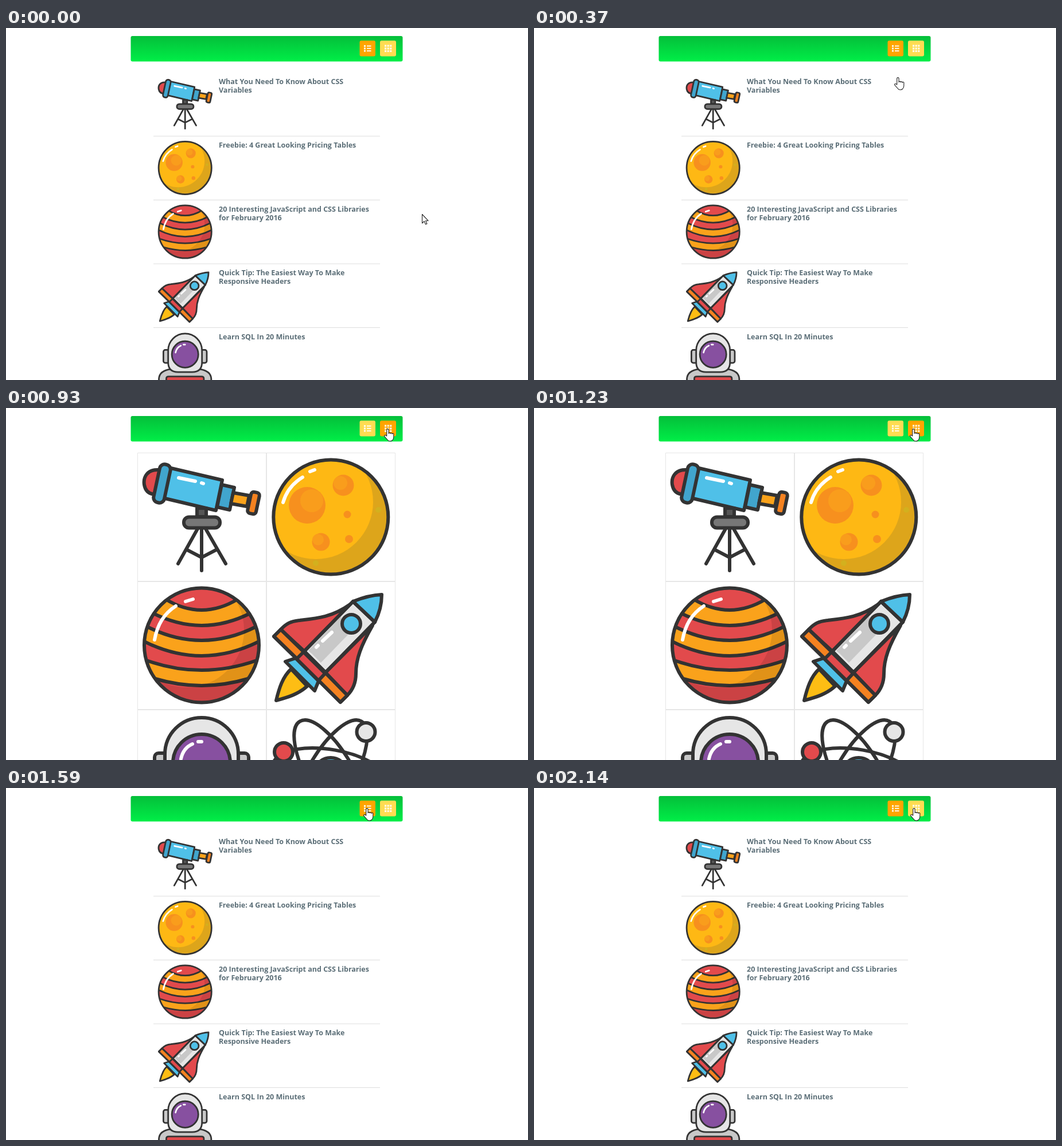
Recreate the animation shown at these times as an HTML page. Size 910 by 615 pixels, loop 2220 ms.

```html
<!DOCTYPE html>
<html lang="en">
<head>
<meta charset="utf-8">
<title>List and grid view</title>
<style>
html, body { margin: 0; width: 100%; height: 100%; overflow: hidden; background: #fff; }
svg { display: block; width: 100vw; height: 100vh; }
text { font: bold 12.5px "Open Sans", "Noto Sans", sans-serif; fill: #5b6e77; }
.ink { stroke: #333; stroke-width: 6; stroke-linejoin: round; stroke-linecap: round; }
.gloss { fill: none; stroke: #fff; stroke-width: 6; stroke-linecap: round; }
.line { fill: none; }
.red { fill: #e24a4c; }
.amber { fill: #faa21b; }
.orange { fill: #f58220; }
.sky { fill: #4fc0e8; }
.steel { fill: #41a5cd; }
.pale { fill: #e6e6e6; }
.gray { fill: #c8c8c8; }
.crater { fill: #f7901e; }
.pointer { fill: #fff; stroke: #222; stroke-width: 1.1; stroke-linejoin: round; }

.list, .grid, .list-button, .grid-button, .cursor, .arrow, .hand {
  animation: 2220ms step-end infinite;
}
.list { animation-name: list; }
.grid { animation-name: grid; }
.list-button { animation-name: list-button; }
.grid-button { animation-name: grid-button; }
.cursor { animation-name: move; }
.arrow { animation-name: arrow; }
.hand { animation-name: hand; }

@keyframes list { 0%, 71.622% { visibility: visible } 41.892% { visibility: hidden } }
@keyframes grid { 0%, 71.622% { visibility: hidden } 41.892% { visibility: visible } }
@keyframes list-button { 0%, 71.622% { fill: #ffa500 } 41.892% { fill: #ffdc52 } }
@keyframes grid-button { 0%, 71.622% { fill: #ffdc52 } 41.892% { fill: #ffa500 } }
@keyframes arrow { 0% { visibility: visible } 6.757%, 100% { visibility: hidden } }
@keyframes hand { 0% { visibility: hidden } 6.757%, 100% { visibility: visible } }
@keyframes move {
  0% { transform: translate(725px, 325px) }
  3.153% { transform: translate(697px, 270px) }
  6.757% { transform: translate(640px, 178px) }
  9.91% { transform: translate(616px, 132px) }
  13.063% { transform: translate(618px, 115px) }
  16.667% { transform: translate(628px, 86px) }
  20.27% { transform: translate(646px, 52px) }
  23.874% { transform: translate(659px, 36px) }
  55.405% { transform: translate(655px, 36px) }
  59.009% { transform: translate(644px, 36px) }
  62.162% { transform: translate(631px, 35px) }
  65.766% { transform: translate(623px, 35px) }
  89.64% { transform: translate(628px, 35px) }
  93.243% { transform: translate(642px, 35px) }
  96.396%, 100% { transform: translate(656px, 35px) }
}
</style>
</head>
<body>
<svg viewBox="0 0 910 615" preserveAspectRatio="none">
<defs>
  <linearGradient id="bar" x2="0" y2="1">
    <stop stop-color="#04bf3a"/><stop offset="1" stop-color="#00ee47"/>
  </linearGradient>
  <clipPath id="moon-disc"><circle cx="566.3" cy="190.5" r="100"/></clipPath>
  <clipPath id="planet-disc"><circle cx="341" cy="414.5" r="100"/></clipPath>

  <g id="telescope" class="ink">
    <path class="red" d="M266 108C246 107 239 121 241 134C243 146 251 151 262 151"/>
    <path class="sky" d="M283 104L377 126L366 179L273 157Z"/>
    <rect class="steel" x="-9.5" y="-34" width="19" height="68" rx="8.5" transform="translate(272 132) rotate(12)"/>
    <path class="steel" d="M376 134L398 139L390 178L368 173Z"/>
    <path class="amber" d="M396 148L424 153L420 172L392 167Z"/>
    <rect class="orange" x="-7.5" y="-19" width="15" height="38" rx="5" transform="translate(431.5 166) rotate(12)"/>
    <path class="gloss" d="M301 122L330 128M341 131L344 132"/>
    <path fill="#555" d="M333 175H349V190H333Z"/>
    <rect fill="#777" x="310" y="190.500" width="63" height="19" rx="9"/>
    <path class="line" d="M341 211V284M334 211L300 272M348 211L383 272M314 247L341 261L368 247"/>
  </g>

  <g id="moon">
    <g clip-path="url(#moon-disc)">
      <path fill="#dda51b" d="M460 85H672V296H460Z"/>
      <circle fill="#feb814" cx="540" cy="164" r="100"/>
    </g>
    <g class="crater">
      <circle cx="525" cy="170" r="32"/><circle cx="588" cy="135" r="18.500"/>
      <circle cx="549" cy="234" r="15.500"/><circle cx="595" cy="186" r="6.500"/><circle cx="598" cy="229" r="7"/>
    </g>
    <g fill="#f99d1c">
      <circle cx="533" cy="162" r="20"/><circle cx="583" cy="131" r="12"/><circle cx="544" cy="230" r="10"/>
    </g>
    <g fill="#d3b01e"><circle cx="649" cy="178" r="5"/><circle cx="540" cy="271" r="5"/></g>
    <circle class="ink line" cx="566.3" cy="190.500" r="100"/>
    <path class="gloss" d="M483 165Q491 137 517 121M530 111L538 108"/>
  </g>

  <g id="planet">
    <g class="ink" clip-path="url(#planet-disc)">
      <path class="red" d="M232 300H450V530H232Z"/>
      <path class="amber" d="M278 334Q341 372 404 334H450V530H232V334Z"/>
      <path class="red" d="M255 358Q341 402 427 358H450V530H232V358Z"/>
      <path class="amber" d="M246 382Q341 430 436 382H450V530H232V382Z"/>
      <path class="red" d="M241 408Q341 458 441 408H450V530H232V408Z"/>
      <path class="amber" d="M245 441Q341 475 437 441H450V530H232V441Z"/>
      <path class="red" d="M260 473Q341 497 422 473H450V530H232V473Z"/>
      <path stroke="none" fill-opacity=".1" fill-rule="evenodd" d="M232 300H450V530H232ZM215 388a100 100 0 1 0 200 0a100 100 0 1 0-200 0Z"/>
    </g>
    <circle class="ink line" cx="341" cy="414.500" r="100"/>
    <path class="gloss" d="M259 405Q266 365 296 346M313 338L326 334"/>
  </g>

  <g id="rocket" class="ink">
    <path fill="#fdbd14" d="M497 456C482 470 476 490 471 511C490 506 510 500 525 486Z"/>
    <path class="sky" d="M487 443L505 437L545 477L538 494Z"/>
    <path class="red" d="M600 343C568 366 540 368 512 371C497 372 488 377 479 387L520 425Z"/>
    <path class="red" d="M639 380C619 415 610 438 610 464C610 482 604 493 595 502L557 462Z"/>
    <path class="pale" d="M605 338L643 374L557 462L520 425Z"/>
    <path class="gray" stroke="none" d="M584 364L598 402L552 448L533 429L527 424Z"/>
    <path class="pale" stroke="none" d="M602 390L616 397L557 457L547 447Z"/>
    <path class="red" d="M479 387L595 502L583 514L467 399Z"/>
    <path class="orange" d="M479 387L519 426L507 438L467 399ZM557 463L595 502L583 514L545 476Z"/>
    <path class="line" d="M605 338L643 374L557 462L520 425Z"/>
    <path class="sky" d="M605 338Q632 327 655 326Q655 351 643 374Z"/>
    <circle class="sky" cx="602" cy="377" r="16"/>
    <path class="gloss" d="M541 418L544 415M552 407L568 392"/>
  </g>

  <g id="astronaut" class="ink">
    <path class="gray" d="M242 745V712Q244 682 285 676H397Q438 682 440 712V745Z"/>
    <path class="red" d="M270 745V712Q270 704 279 704H403Q412 704 412 712V745Z"/>
    <rect class="gray" x="259" y="603" width="24" height="49" rx="7"/>
    <rect class="gray" x="399" y="603" width="24" height="49" rx="7"/>
    <path class="pale" d="M277 650V605A64 64 0 0 1 405 605V650Q405 687 368 687H314Q277 687 277 650Z"/>
    <circle fill="#8750a0" cx="341" cy="620" r="50"/>
    <path class="gloss" d="M305 613Q309 594 325 587M335 583L341 583"/>
  </g>

  <g id="atom" class="ink">
    <circle class="sky" cx="566" cy="640" r="29"/>
    <g class="line" transform="translate(566 640)">
      <ellipse rx="107" ry="40" transform="rotate(60)"/>
      <ellipse rx="107" ry="40" transform="rotate(-60)"/>
      <ellipse rx="102" ry="43" transform="rotate(10)"/>
    </g>
    <circle class="red" cx="484" cy="601" r="16"/>
    <circle class="pale" cx="627.500" cy="566" r="16"/>
  </g>
</defs>

<rect width="910" height="615" fill="#fff"/>
<rect x="217.500" y="14" width="474" height="44.500" rx="3" fill="url(#bar)"/>
<rect class="list-button" x="616.500" y="22" width="27.500" height="27.500" rx="3"/>
<rect class="grid-button" x="652" y="22" width="28" height="27.500" rx="3"/>
<path fill="none" stroke="#fff" stroke-opacity=".9" stroke-width="2" d="M629 31.500H636.500M629 35.800H636.500M629 40H636.500"/>
<path fill="none" stroke="#fff" stroke-opacity=".9" stroke-width="3" stroke-dasharray="3 1.300" d="M625.500 30V42"/>
<g fill="none" stroke="#fff" stroke-opacity=".85" stroke-width="3.200" stroke-dasharray="3.200 1.400">
  <path d="M660 31.200H672.500M660 35.800H672.500M660 40.400H672.500"/>
</g>

<g class="list">
  <path stroke="#ddd" d="M257 189H652M257 300.500H652M257 412H652M257 523.500H652"/>
  <g transform="translate(264.700 85.600) scale(.461)"><use href="#telescope" x="-238" y="-88"/></g>
  <g transform="translate(264.700 197.200) scale(.461)"><use href="#moon" x="-463.300" y="-88"/></g>
  <g transform="translate(264.700 308.800) scale(.461)"><use href="#planet" x="-238" y="-312"/></g>
  <g transform="translate(264.700 420.400) scale(.461)"><use href="#rocket" x="-463.300" y="-312"/></g>
  <g transform="translate(264.700 532) scale(.461)"><use href="#astronaut" x="-238" y="-537"/></g>
  <text x="371" y="97.500">What You Need To Know About CSS<tspan x="371" dy="15">Variables</tspan></text>
  <text x="371" y="209">Freebie: 4 Great Looking Pricing Tables</text>
  <text x="371" y="320.700">20 Interesting JavaScript and CSS Libraries<tspan x="371" dy="15">for February 2016</tspan></text>
  <text x="371" y="432.200">Quick Tip: The Easiest Way To Make<tspan x="371" dy="15">Responsive Headers</tspan></text>
  <text x="371" y="543.800">Learn SQL In 20 Minutes</text>
</g>

<g class="grid">
  <path fill="none" stroke="#e6e6e6" d="M229.500 615V78.500H678.500V615"/>
  <path stroke="#e6e6e6" stroke-width="2" d="M454 78V615M229 303H679M229 527H679"/>
  <use href="#telescope"/><use href="#moon"/><use href="#planet"/>
  <use href="#rocket"/><use href="#astronaut"/><use href="#atom"/>
</g>

<g class="cursor pointer">
  <path class="arrow" d="M.5 .5V16L4.100 12.600L6.500 18L8.900 17L6.600 11.700H11Z"/>
  <path class="hand" d="M4.700 13V2.300a1.700 1.700 0 0 1 3.400 0V8.500a1.600 1.600 0 0 1 3.100 .2a1.500 1.500 0 0 1 2.900 .7a1.400 1.400 0 0 1 2.700 1V15Q16.800 18 14.500 20.500Q13 22 10.500 22Q7.500 22 6 19.500L1 13.800a1.500 1.500 0 0 1 2-2.200Z"/>
</g>
</svg>
</body>
</html>
```
